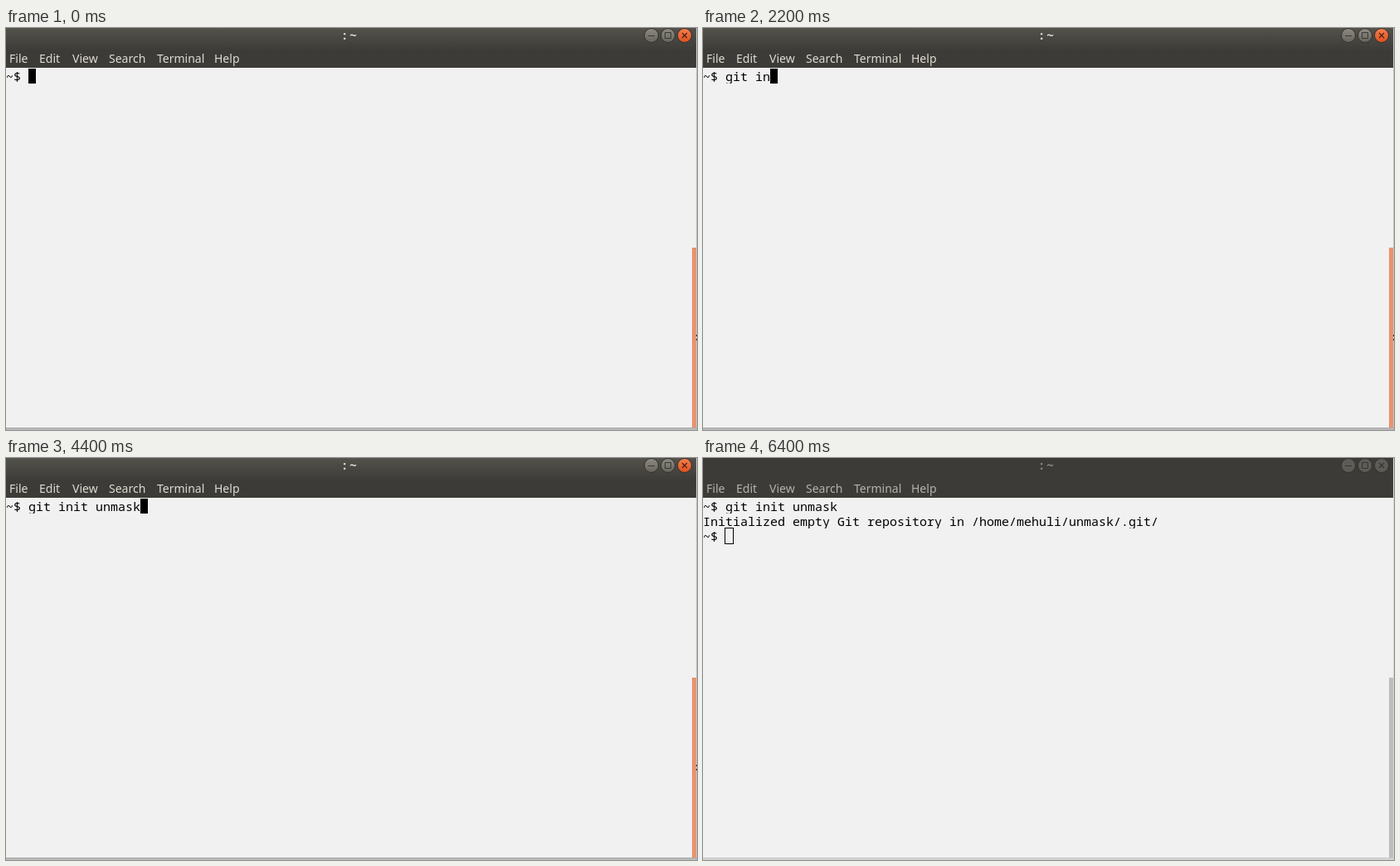
Write an HTML page that moves like this. It is 833x485 px and loops after 6.5 s.

```html
<!DOCTYPE html>
<html lang="en">
<head>
<meta charset="utf-8">
<title>Terminal</title>
<style>
  html, body { margin: 0; width: 100%; height: 100%; overflow: hidden; background: #f1f1f1; }

  #stage {
    --n: 3;        /* visible columns of the command line */
    --dx: 0;       /* cursor offset from the end of the command */
    --row: 0;
    --fill: #000;
    --line: transparent;
    --output: hidden;
    --behind: visible;
    --bar: linear-gradient(#56554e 0, #504f48 3px, #3e3d39 25px, #3c3b37 28px);
    --title: #dfdbd2;
    --menu: #dfdbd2;
    --thumb: #eb926c;
    --edge: #c4c4c4;
    --shadow: linear-gradient(#a8a8a8, #c2c2c2);
    --btn: url(#grey);
    --close: url(#orange);
    --rim: #32312d;
    --glyph: #3a3934;
    --cross: #4a2010;
    position: absolute; left: 0; top: 0; width: 833px; height: 485px;
    overflow: hidden; background: #f1f1f1; color: #000;
    animation: type 6.5s step-end infinite, cursor 6.5s step-end infinite, focus 6.5s step-end infinite;
  }
  #stage div, #stage span, svg { position: absolute; white-space: pre; }

  .bar { left: 0; top: 0; width: 832px; height: 48px; background: var(--bar) #3c3b37; background-size: 100% 28px; background-repeat: no-repeat; }
  .title { left: 406px; top: -1px; font: bold 15px/18px "Noto Sans", sans-serif; color: var(--title); }
  .menu span { top: 28px; font: 14px/18px "Noto Sans", sans-serif; color: var(--menu); }
  .edge { left: 832px; top: 0; width: 1px; height: 485px; background: var(--edge); }
  .shadow { left: 0; top: 482px; width: 833px; height: 3px; background: var(--shadow); }
  .thumb { left: 827px; top: 265px; width: 5px; height: 217px; background: var(--thumb); }
  .behind { left: 832px; width: 1px; height: 2px; background: #333; visibility: var(--behind); }

  .row { left: 0; height: 18px; overflow: hidden; font: 15px/18px "Noto Sans Mono", "DejaVu Sans Mono", monospace; }
  .typed { top: 49px; width: calc(var(--n) * 9px); }
  .out { visibility: var(--output); }
  .cursor {
    left: calc((var(--n) + var(--dx)) * 9px); top: calc(49px + var(--row) * 18px);
    width: 9px; height: 18px; background: var(--fill); outline: 1px solid var(--line);
  }

  svg { left: 766px; top: 0; }
  .btn { fill: var(--btn); stroke: var(--rim); }
  .close { fill: var(--close); }
  .mark { fill: none; stroke: var(--glyph); }
  .cross { stroke: var(--cross); stroke-width: 1.2; }

  @keyframes type {
    0% { --n: 3; }
    15.384% { --n: 5; }
    20% { --n: 6; }
    21.538% { --n: 7; }
    27.692% { --n: 8; }
    33.846% { --n: 9; }
    35.384% { --n: 10; }
    38.461% { --n: 12; }
    47.692% { --n: 13; }
    50.769% { --n: 14; }
    56.923% { --n: 15; }
    61.538% { --n: 16; }
    66.153% { --n: 17; }
    67.692%, 100% { --n: 18; }
  }
  @keyframes cursor {
    0% { --dx: 0; --row: 0; --fill: #000; --output: hidden; --behind: visible; }
    9.23% { --fill: transparent; }
    15.384% { --fill: #000; }
    76.923% { --dx: -18; --row: 1; }
    80% { --dx: -15; --row: 2; --output: visible; --behind: hidden; }
    84.615% { --fill: transparent; }
    93.846% { --fill: #000; }
    98.461% { --fill: transparent; }
    100% { --dx: -15; --row: 2; --fill: transparent; --output: visible; --behind: hidden; }
  }
  @keyframes focus {
    98.461%, 100% {
      --line: #000;
      --bar: linear-gradient(#3c3b37, #3c3b37);
      --title: #8b8982;
      --menu: #b5b2aa;
      --thumb: #bdbdbd;
      --edge: #dadada;
      --shadow: linear-gradient(#c8c8c8, #dadada);
      --btn: #5e5c56;
      --close: #5e5c56;
      --rim: #34332f;
      --glyph: #35342f;
      --cross: #35342f;
    }
  }
</style>
</head>
<body>
<div id="stage">
  <div class="bar"></div>
  <div class="title">: ~</div>
  <div class="menu">
    <span style="left:4px">File</span>
    <span style="left:40px">Edit</span>
    <span style="left:80px">View</span>
    <span style="left:124px">Search</span>
    <span style="left:182px">Terminal</span>
    <span style="left:251px">Help</span>
  </div>
  <svg width="66" height="20">
    <defs>
      <linearGradient id="grey" x2="0" y2="1"><stop stop-color="#8c8a82"/><stop offset="1" stop-color="#66645c"/></linearGradient>
      <linearGradient id="orange" x2="0" y2="1"><stop stop-color="#f4804f"/><stop offset="1" stop-color="#e0501f"/></linearGradient>
    </defs>
    <circle class="btn" cx="12" cy="9" r="8.5"/>
    <circle class="btn" cx="32" cy="9" r="8.5"/>
    <circle class="btn close" cx="52" cy="9" r="8.5"/>
    <path class="mark" d="M8 9.5h8M28.5 5.5h7v7h-7z"/>
    <path class="mark cross" d="M49 6l6 6M55 6l-6 6"/>
  </svg>

  <div class="row typed">~$ git init unmask</div>
  <div class="row out" style="top:67px">Initialized empty Git repository in /home/mehuli/unmask/.git/</div>
  <div class="row out" style="top:85px">~$ </div>
  <div class="cursor"></div>

  <div class="thumb"></div>
  <div class="edge"></div>
  <div class="shadow"></div>
  <div class="behind" style="top:370px"></div>
  <div class="behind" style="top:375px"></div>
</div>
</body>
</html>
```
